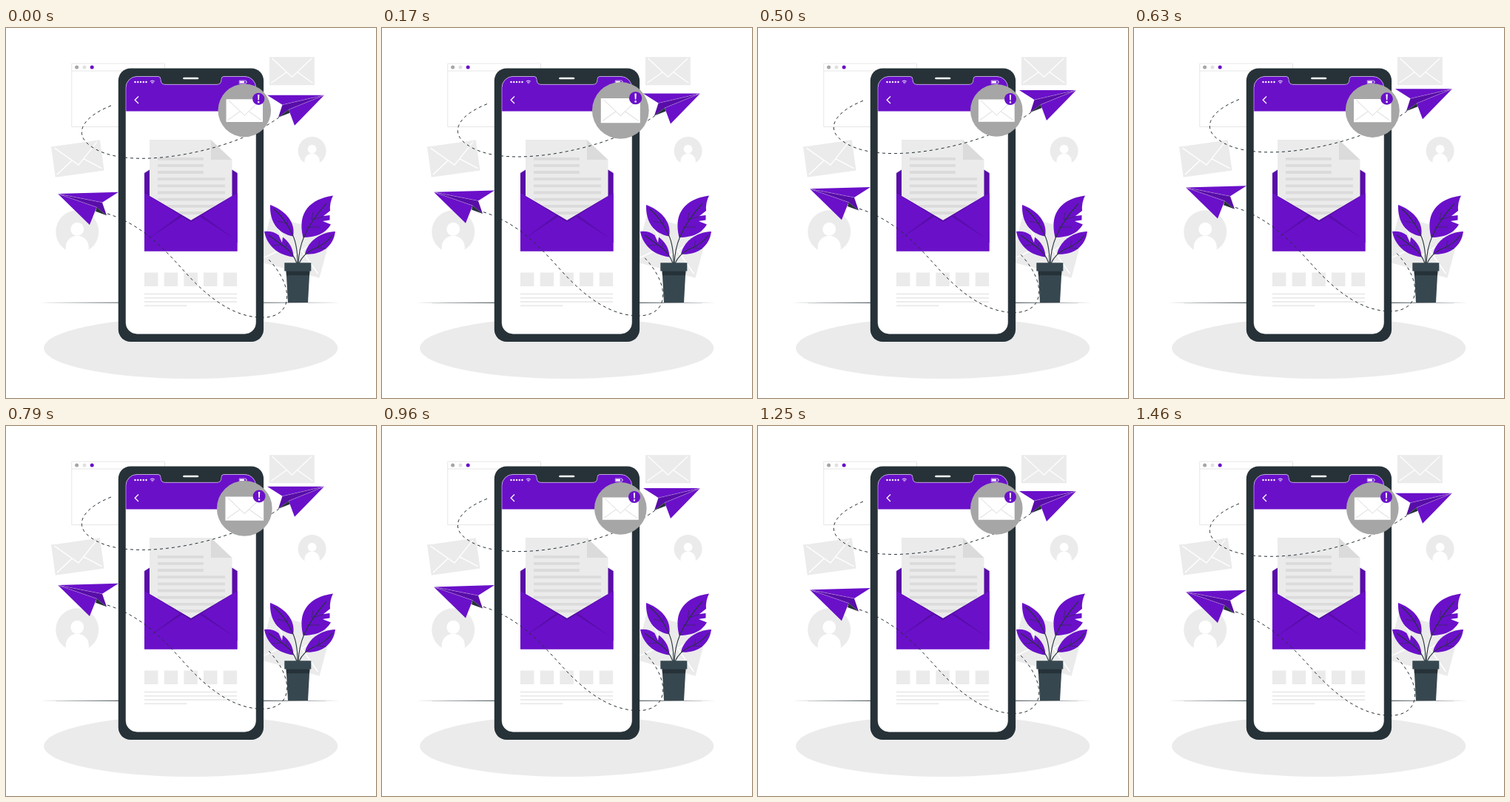
Write an HTML page that moves like this. It is 500 px wide and 500 px high and loops after 1.5 s.

```html
<!DOCTYPE html>
<html lang="en">
<head>
<meta charset="utf-8">
<title>New mail</title>
<style>
  html, body { margin: 0; height: 100%; overflow: hidden; background: #fff; }
  svg { display: block; width: 100vw; height: 100vh; }
  .main { fill: #6a10c9; }
  .shade { fill: #580da8; }
  .dark { fill: #263238; }
  .pot { fill: #37474f; }
  .pale { fill: #ebebeb; }
  .white { fill: #fff; }
  .line { fill: none; stroke: #fff; }
  .ink { fill: none; stroke: #263238; }
  .crease { fill: none; stroke: #fff; stroke-width: .4; opacity: .6; }
</style>
</head>
<body>
<svg viewBox="0 0 500 500">
  <defs>
    <g id="mail">
      <path stroke="none" d="M-30.500-19h61v38h-61z"/>
      <path fill="none" d="M-26.500-17 0 8 26.500-17M-28 16-7.500 1.500M28 16 7.500 1.500"/>
    </g>
    <g id="avatar">
      <circle class="pale" r="29"/>
      <circle class="white" cy="-3.500" r="9"/>
      <path class="white" d="M-15.500 29V21a15.500 15.500 0 0 1 31 0V29z"/>
    </g>
    <clipPath id="screen">
      <path id="outline" d="M162 80.500A15 15 0 0 1 177 65.500H205.500Q209 65.500 209 69.500 209 76.300 215 76.300H285Q291 76.300 291 69.500 291 65.500 294.500 65.500H322.600A15 15 0 0 1 337.600 80.500V398.200A15 15 0 0 1 322.600 413.200H177A15 15 0 0 1 162 398.200z"/>
    </clipPath>
    <clipPath id="sheet"><path d="M194 151H277L305.500 178V227L250 260 194 227z"/></clipPath>
  </defs>

  <!-- backdrop -->
  <ellipse class="pale" cx="249.700" cy="432.500" rx="198.500" ry="41.500"/>
  <path class="dark" d="M43 371.100Q250 369.700 455 371.100 250 372.500 43 371.100"/>
  <path fill="none" stroke="#e6e6e6" d="M88.800 48H214.500V133.500H88.800zM88.800 58H214.500"/>
  <circle cx="95.600" cy="53" r="2.500" fill="#a6a6a6"/>
  <circle cx="106" cy="53" r="2.500" fill="#e0e0e0"/>
  <circle cx="116.200" cy="53" r="2.500" class="main"/>
  <g class="pale" stroke="#fff">
    <use href="#mail" transform="translate(386.400 58.200)" stroke-width="1.300"/>
    <use href="#mail" transform="translate(96.800 176.500) rotate(-8) scale(1.090)" stroke-width="1.300"/>
    <use href="#mail" transform="translate(390.500 296) rotate(15) scale(1.400 1.670)"/>
  </g>
  <use href="#avatar" x="96.300" y="275.300"/>
  <use href="#avatar" transform="translate(413.600 166) scale(.655)"/>

  <!-- phone -->
  <rect class="dark" x="151.800" y="54.500" width="196.300" height="369.500" rx="16.500"/>
  <g clip-path="url(#screen)">
    <path class="white" d="M160 60h180v360H160z"/>
    <path class="main" d="M160 60h180v52.600H160z"/>
  </g>
  <use href="#outline" fill="none" stroke="#fff" stroke-width=".500"/>
  <path class="line" stroke-width="2.600" stroke-linecap="round" d="M240.500 68H259"/>
  <path class="line" stroke-width="2.400" stroke-linecap="round" stroke-dasharray="0 3.750" d="M174.500 73h15.200"/>
  <path class="line" stroke-width=".9" d="M194.800 72.200q3-2.400 6 0M196.200 73.700q1.700-1.300 3.400 0M197.300 74.800h1"/>
  <path class="line" stroke-width=".6" d="M315.300 71h9v4.200h-9zM325.300 72v2"/>
  <path class="white" d="M316 71.700h6v2.800h-6z"/>
  <path class="line" stroke-width="1.300" d="M179 92.500 174.200 97.200 179 102"/>

  <!-- letter -->
  <path class="shade" d="M187 196 194 191.500H305.500L312.700 196V290H187z"/>
  <g clip-path="url(#sheet)">
    <path class="pale" d="M190 150h120v115H190z"/>
    <path fill="#dbdbdb" d="M277 151V178H305.500z"/>
    <path fill="none" stroke="#dbdbdb" stroke-width="3.800" d="M205 176.800h62M205 185.900h62M205 195h62M205 204.200h91M205 213.300h91M205 222.500h91M205 231.700h91M205 240.900h91M205 250h91"/>
  </g>
  <path class="main" d="M187 223 250 260.500 312.700 223V301.800H187z"/>
  <path class="shade" d="M194 227 250 260 305.500 227 250 262.500zM191 285.500 236 252.500 239 254.200zM309.500 285.500 264 252.500 261 254.200z"/>

  <g class="pale">
    <path d="M187 330.500h18.500v18.500H187zM213.700 330.500h18.500v18.500h-18.500zM240.400 330.500h18.500v18.500h-18.500zM267 330.500h18.500v18.500H267zM293.700 330.500h18.500v18.500h-18.500z"/>
    <path d="M187 358.500h125v2H187zM187 363.700h125v2H187zM187 369h125v2H187zM187 374.200h57.500v2H187z"/>
  </g>

  <!-- planes and their trails -->
  <g id="flight">
    <path class="ink" stroke-dasharray="4 4" d="M142 105.200C100 122 92 145 115 160.200 158 191 260 173 318 149.200Q345 138 369 121M137 251.200C184 266 214 299 242 330.200 276 368 310 391.500 347 391.500 388 391 391 350 353 311"/>
    <path class="main" d="M70 224.300 152 222 130 236zM70 224.300 122.500 242.500 113 266.300z"/>
    <path class="shade" d="M70 224.300 130 236 136 253.500 122.500 242.500z"/>
    <path class="dark" d="M122.500 242.500 136 253.500 121 248z"/>
    <path class="crease" d="M130 236 70 224.300 122.500 242.500"/>
    <path class="main" d="M430 91 353 91 373.500 104zM430 91 382 110.500 390 132z"/>
    <path class="shade" d="M430 91 373.500 104 368 121 382 110.500z"/>
    <path class="dark" d="M368 121 382 110.500 383.500 115z"/>
    <path class="crease" d="M373.500 104 430 91 382 110.500"/>
  </g>

  <!-- plant -->
  <g class="main">
    <path d="M442 226.500C412 231 393 248 401.500 283 418 283 432 278 439 265.500L428 261 437.500 259.500V253L429 254 438 247Q437 236 442 226.500z"/>
    <path d="M357 239C374 245 392 260 388 281.500 368 278 356 263 357 239z"/>
    <path d="M349 275Q361 274 368.500 280L373 290 374 282.500Q388 293 388.500 309.500C368 307 353 295 349 275z"/>
    <path d="M445 275C426 276 408 287 404 305.500 423 307 442 298 445 275z"/>
  </g>
  <path class="ink" stroke-width="1.100" d="M395 318C396 295 402 272 433 237M394 318Q394 290 385 275 376 256 361 244M393 318Q388 304 378 297L355 280M396 318Q402 305 415 299 433 292 441 280"/>
  <path class="ink" stroke-width=".6" d="M413 259 415 249M413 259 428 255M407 269 424 269M379 264 367 261M380 266 381 257M372 293 360 294M378 297 380 290M422 296 424 287M420 297 433 298"/>
  <path class="pot" d="M378.500 326H410.500L408 371H381z"/>
  <path class="dark" d="M378.600 328.500H410.400L410 334.200H379z"/>
  <path class="pot" d="M376.300 317.200h36v11.400h-36z"/>

  <!-- notification -->
  <g id="alert">
    <circle cx="322.300" cy="111.400" r="35.300" fill="#a6a6a6"/>
    <use href="#mail" transform="translate(322.300 111.600) scale(.800)" fill="#fff" stroke="#d6d6d6" stroke-width="1.100"/>
    <circle cx="341" cy="96" r="8" class="main"/>
    <path class="white" d="M339.900 90.300h2.200l-.4 7.400h-1.400zM339.900 99.200h2.200v2.200h-2.200z"/>
  </g>
</svg>
<script>
  const LOOP = 1500, LEAD = 20;
  const CENTER = [322.3, 111.4];
  const flight = document.getElementById('flight');
  const alertIcon = document.getElementById('alert');

  // Linear rise from a to b, then fall back by c
  const bump = (p, a, b, c) =>
    Math.max(0, p < b ? (p - a) / (b - a) : (c - p) / (c - b));

  function draw(now) {
    const p = ((now + LEAD) % LOOP) / LOOP;
    const lift = 10 * bump(p, 0, .5, 1);
    const scale = 1 + .1 * (bump(p, 0, .1, .3) + bump(p, .4, .5, .6));
    const [x, y] = CENTER;
    flight.setAttribute('transform', `translate(0 ${-lift})`);
    alertIcon.setAttribute('transform',
      `translate(${x} ${y}) scale(${scale}) translate(${-x} ${-y})`);
    requestAnimationFrame(() => draw(performance.now()));
  }
  draw(performance.now());
</script>
</body>
</html>
```
